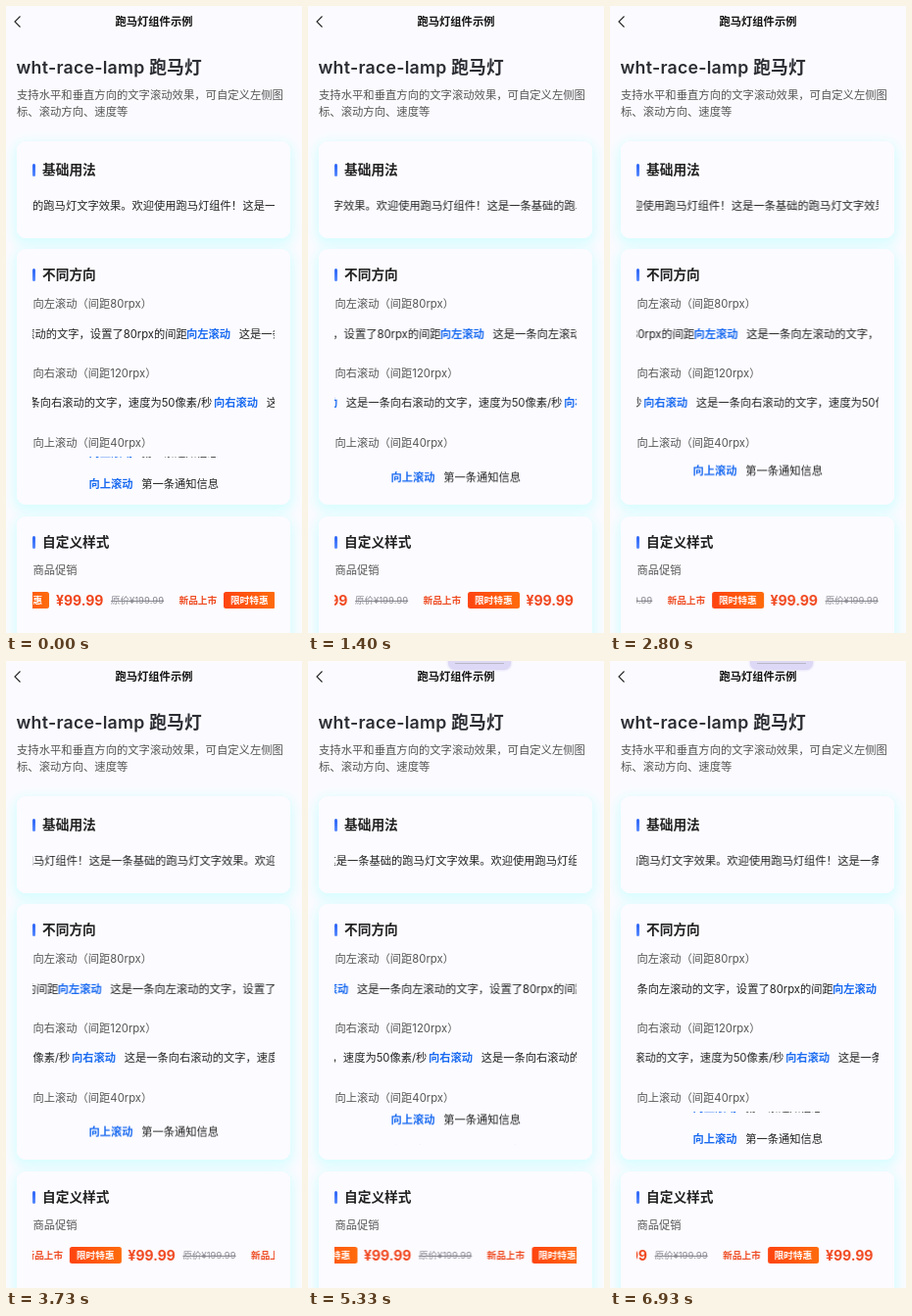
Animation, 302 px wide and 640 px high, one loop 6.99 s. Source, as an HTML page:

```html
<!DOCTYPE html>
<html lang="zh-CN">
<head>
<meta charset="utf-8">
<title>跑马灯组件示例</title>
<style>
  html, body { margin: 0; width: 100%; height: 100%; overflow: hidden; }
  body {
    position: relative;
    background: #fbfbff;
    color: #222;
    font: 11.28px/20px Inter, "Noto Sans CJK SC", "Noto Sans SC", "Noto Sans CJK", sans-serif;
    white-space: nowrap;
  }
  .stage { position: absolute; left: 0; top: 0; width: 302px; height: 640px; overflow: hidden; }
  .stage > *, .item > * { position: absolute; }

  .nav { left: 0; width: 302px; top: 5.5px; text-align: center; font-weight: 700; color: #111; }
  .back { left: 7px; top: 9px; }
  .name {
    left: 10.5px; top: 53px; margin: 0;
    font-size: 17.72px; font-weight: 600; letter-spacing: .25px; color: #2b2d33;
  }
  .intro { left: 11px; top: 82.5px; font-size: 11.34px; line-height: 17px; color: #555; }

  .glow, .card { left: 11px; width: 279px; border-radius: 9px; }
  .glow { box-shadow: 0 4px 12px 3px #d8fdff; }
  .card { background: #fcfbff; }
  .c1 { top: 138px; height: 99px; }
  .c2 { top: 248px; height: 261px; }
  .c3 { top: 521px; height: 140px; }

  h2 { left: 37px; margin: 0; font-size: 13.69px; font-weight: 700; color: #222; }
  h2::before {
    content: ""; position: absolute; left: -10px; top: 4px;
    width: 3px; height: 13px; border-radius: 1.5px;
    background: linear-gradient(#2a63f6, #5a8cff);
  }
  .label { left: 27.5px; color: #555; }

  .row { left: 27px; width: 247px; height: 20px; overflow: hidden; }
  .track {
    position: absolute; left: var(--from); top: 0; display: flex;
    animation: slide 6990ms steps(105) -4ms infinite;
  }
  .item { flex: none; position: relative; width: var(--pitch); height: 20px; }
  .item b { color: #1a6bf0; left: 0; }
  .item .say { left: 53.7px; }
  @keyframes slide { to { transform: translate(var(--dx, 0px), var(--dy, 0px)); } }

  .up { top: 460px; height: 34px; }
  .up .track { top: -14.5px; flex-direction: column; }
  .up .item { height: 32px; }

  .sale .badge {
    left: 0; top: 1px; width: 52.5px; height: 17.5px; line-height: 17.5px;
    border-radius: 2.5px; text-align: center;
    color: #fff; font-size: 9.66px; font-weight: 700;
    background: linear-gradient(90deg, #ff4410, #ff6c0c);
  }
  .sale .price { left: 59.5px; font-size: 14px; font-weight: 700; color: #f0451c; }
  .sale .was { left: 115.5px; font-size: 9.5px; color: #888890; text-decoration: line-through; }
  .sale .new { left: 185px; font-size: 9.66px; font-weight: 700; color: #ee4a20; }

  .pill {
    left: 143px; top: -8px; width: 64px; height: 17px; border-radius: 7px;
    background: #dcd8f5; box-shadow: 0 0 3px #d2cdf0;
    animation: reveal 6990ms step-end infinite;
  }
  .pill::after {
    content: ""; position: absolute; left: 7px; top: 10px;
    width: 50px; height: 1px; background: #b9b7c6;
  }
  @keyframes reveal { 0% { opacity: 0; } 64.8%, 100% { opacity: 1; } }
</style>
</head>
<body>
<div class="stage">
  <div class="glow c1"></div><div class="glow c2"></div><div class="glow c3"></div>
  <div class="card c1"></div><div class="card c2"></div><div class="card c3"></div>

  <div class="pill"></div>
  <svg class="back" width="9" height="14" fill="none" stroke="#222" stroke-width="1.1"><path d="M7.5 1.5 2 7l5.5 5.5"/></svg>
  <div class="nav">跑马灯组件示例</div>
  <h1 class="name">wht-race-lamp 跑马灯</h1>
  <div class="intro">支持水平和垂直方向的文字滚动效果，可自定义左侧图<br>标、滚动方向、速度等</div>

  <h2 style="top:156.5px">基础用法</h2>
  <div class="row" style="top:194px">
    <div class="track" data-copies="3" style="--from:-67.5px;--pitch:282px;--dx:-294px">
      <div class="item"><span>这是一条基础的跑马灯文字效果。欢迎使用跑马灯组件！</span></div>
    </div>
  </div>

  <h2 style="top:264px">不同方向</h2>
  <div class="label" style="top:293.5px">向左滚动（间距80rpx）</div>
  <div class="row" style="top:324.5px">
    <div class="track" data-copies="3" style="--from:-130px;--pitch:287px;--dx:-246.4px">
      <div class="item"><b>向左滚动</b><span class="say">这是一条向左滚动的文字，设置了80rpx的间距</span></div>
    </div>
  </div>

  <div class="label" style="top:364.5px">向右滚动（间距120rpx）</div>
  <div class="row" style="top:395px">
    <div class="track" data-copies="3" style="--from:-367px;--pitch:276px;--dx:245.4px">
      <div class="item"><b>向右滚动</b><span class="say">这是一条向右滚动的文字，速度为50像素/秒</span></div>
    </div>
  </div>

  <div class="label" style="top:435.5px">向上滚动（间距40rpx）</div>
  <div class="row up">
    <div class="track" data-copies="8" style="--from:57.5px;--pitch:140px;--dy:-193.9px">
      <div class="item"><b>向上滚动</b><span class="say">第一条通知信息</span></div>
    </div>
  </div>

  <h2 style="top:536.5px">自定义样式</h2>
  <div class="label" style="top:565.5px">商品促销</div>
  <div class="row sale" style="top:596.5px">
    <div class="track" data-copies="4" style="--from:-35.5px;--pitch:230.5px;--dx:-294.7px">
      <div class="item">
        <span class="badge">限时特惠</span><span class="price">¥99.99</span>
        <span class="was">原价¥199.99</span><span class="new">新品上市</span>
      </div>
    </div>
  </div>
</div>
<script>
  // Repeat each item so the track always covers its window.
  for (const track of document.querySelectorAll('.track')) {
    const item = track.firstElementChild;
    for (let i = 1; i < track.dataset.copies; i++) track.append(item.cloneNode(true));
  }
</script>
</body>
</html>
```
